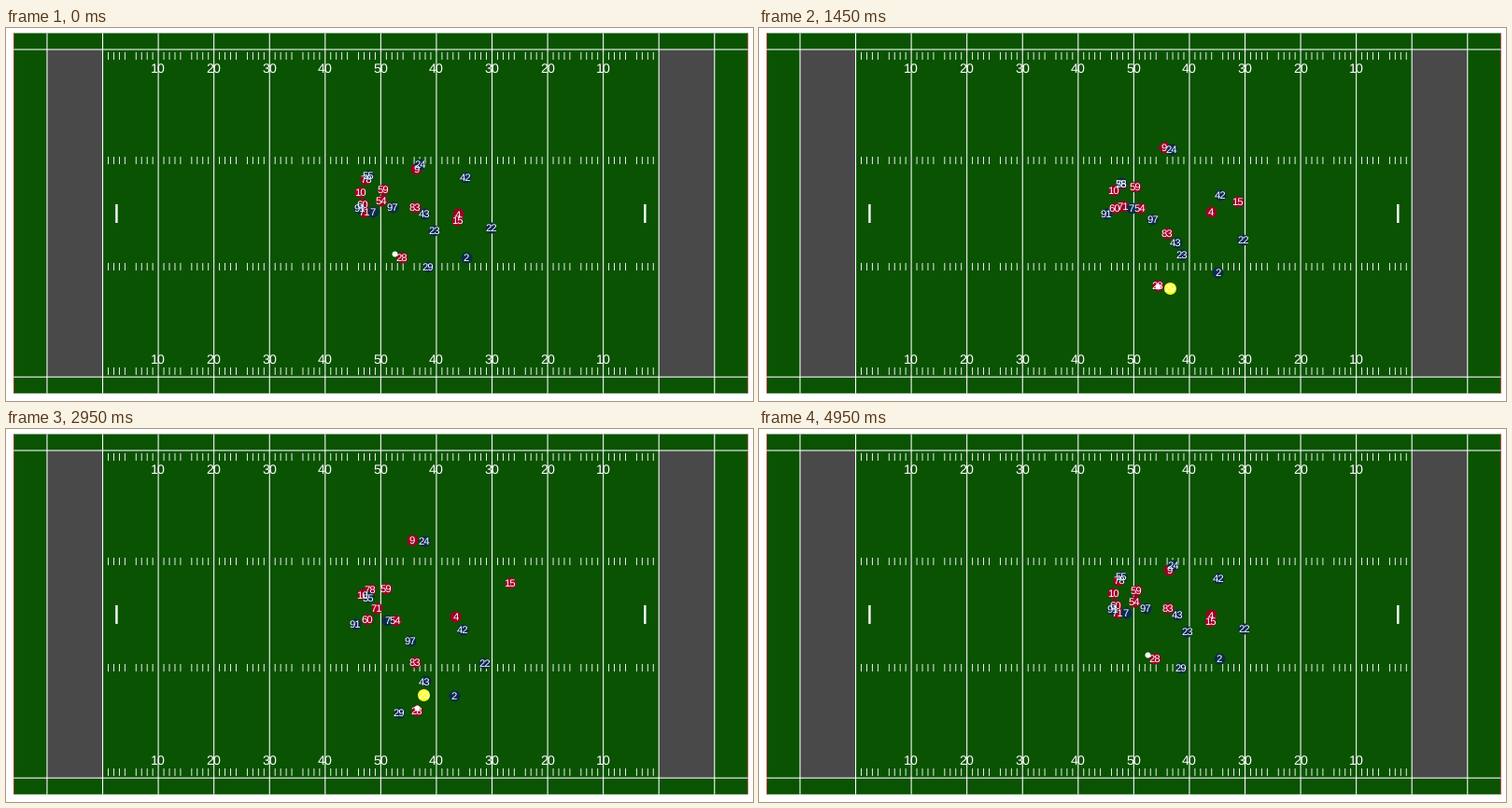
A matplotlib script for the animation above (5 s loop, 800 by 400 pixels).

```python
import numpy as np
import matplotlib.pyplot as plt
from matplotlib.animation import FuncAnimation
from matplotlib.patches import Rectangle

W, H, DPI = 800, 400, 100
FRAMES, STEP_MS = 100, 50
PT = 72 / DPI  # points per pixel
plt.rcParams["text.hinting"] = "none"

GREEN, GRAY = "#0a5302", "#494949"
RED, NAVY, YELLOW = "#9b0026", "#0a2c4c", "#ffff1e"

# The panel spans 132 by 58.67 yards, with 16 and 2.67 yards of margin.
LEFT, RIGHT, TOP, BOTTOM = 8.22, 794.52, 5.48, 391.78
YARD = (RIGHT - LEFT) / 132
GOAL = LEFT + 16 * YARD
MARGIN = (BOTTOM - TOP) / 22
SIDE_TOP, SIDE_BOTTOM = TOP + MARGIN, BOTTOM - MARGIN
REACH = 3.1 * YARD  # a defender this close to the ball is marked
LINE, TEXT_PX = 1.07, 11.4

# Each run is a polynomial through a few points evenly spaced in time.
OFFENSE = {
    28: [(424, 246), (432, 289), (459, 320)],
    9: [(439.5, 151), (433.5, 122), (441, 124.5)],
    78: [(385.5, 162), (392, 176.5)],
    10: [(379, 176), (380.5, 175), (385, 185)],
    59: [(404, 173), (404.5, 170), (414, 174)],
    54: [(401.5, 185), (412, 198), (428, 220)],
    60: [(382, 189), (383, 197), (399.5, 221)],
    71: [(384, 197), (393, 190.5), (404.5, 198)],
    83: [(438, 192), (437, 234), (442, 278)],
    4: [(484, 199.5), (483, 198), (477, 209)],
    15: [(483.5, 206), (526, 176), (561, 144)],
}
DEFENSE = {
    24: [(443.5, 146), (443.5, 124), (460, 118)],
    42: [(492.5, 160), (492.5, 194), (479.5, 264)],
    55: [(388, 158), (388, 172.5), (388.5, 198)],
    97: [(414, 192), (426.5, 214.5), (447.5, 255)],
    43: [(448.5, 199), (447, 248), (454, 316)],
    23: [(458.5, 217), (453, 243), (447.5, 283), (449.5, 322)],
    22: [(519.5, 214), (516, 237), (502.5, 283)],
    2: [(493, 246), (487, 272.5), (461, 316)],
    29: [(452, 256), (440, 279), (421.5, 303.5), (417.5, 310)],
    7: [(393, 197), (403, 196.5), (420.5, 232)],
    91: [(378.5, 193), (371.5, 203.5), (384.5, 222)],
}
BALL = [(416, 242), (427, 277), (439.5, 298.5), (456.5, 319)]


def fit(points):
    n = len(points)
    return np.polyfit(np.linspace(0, 1, n), points, n - 1)


curves = [fit(p) for p in (*OFFENSE.values(), *DEFENSE.values(), BALL)]


def progress(tick):
    """Share of the run at a tick; the data advances on five ticks in six."""
    if tick == FRAMES - 1:  # the last tick is back at the start
        return 0.0
    u = int(0.8375 * tick) / 72
    return u if u < 1 else 1 + 0.7 * (u - 1)


fig = plt.figure(figsize=(W / DPI, H / DPI), dpi=DPI, facecolor="white")
ax = fig.add_axes([0, 0, 1, 1])
ax.set(xlim=(0, W), ylim=(H, 0))
ax.axis("off")


def box(x0, y0, x1, y1, color):
    ax.add_patch(Rectangle((x0, y0), x1 - x0, y1 - y0, fc=color, ec="none",
                           snap=False, zorder=1))


def vlines(x, y0, y1, width=LINE, color="white"):
    ax.vlines(x, y0, y1, colors=color, lw=width * PT, zorder=2).set_snap(False)


def label(x, y, text, px, z):
    return ax.text(x, y + 0.36 * px, str(text), color="white", family="Liberation Sans",
                   size=px * PT, ha="center", va="baseline", zorder=z)


def dots(diameter, color, z):
    return ax.scatter([], [], s=(diameter * PT) ** 2, c=color, linewidths=0, zorder=z)


def yard_x(yard):
    return GOAL + YARD * np.asarray(yard)


def draw_field():
    box(LEFT, TOP, RIGHT, BOTTOM, GREEN)
    for goal in (-10, 100):
        box(yard_x(goal), SIDE_TOP, yard_x(goal + 10), SIDE_BOTTOM, GRAY)
    vlines([LEFT + 0.3, RIGHT - 0.3], TOP, BOTTOM, 0.7, "#c03020")
    vlines(yard_x(range(-10, 111, 10)), TOP, BOTTOM)
    ax.hlines([SIDE_TOP, SIDE_BOTTOM], LEFT, RIGHT, colors="white",
              lw=LINE * PT, zorder=2).set_snap(False)
    hashes = yard_x([y for y in range(100) if y % 5])
    for y in (26, 138, 252, 364):
        vlines(hashes, y, y + 8, 0.9)
    vlines(yard_x([2.5, 97.5]), 189, 209, 2.4)
    for yard in range(10, 100, 10):
        for y in (43, 355):
            label(yard_x(yard), y, min(yard, 100 - yard), 14.2, 3)


draw_field()
offense = dots(12, RED, 4)
defense = dots(12, NAVY, 5)
marked = dots(13, YELLOW, 6)
jerseys = [label(0, 0, n, TEXT_PX, 7) for n in (*OFFENSE, *DEFENSE)]
ball_dot = dots(6, "white", 8)


def draw(tick):
    u = progress(tick)
    spots = np.array([np.polyval(c, u) for c in curves])
    n = len(OFFENSE)
    backs, ball = spots[n:-1], spots[-1]
    offense.set_offsets(spots[:n])
    defense.set_offsets(backs)
    ball_dot.set_offsets([ball])
    gap = np.hypot(*(backs - ball).T)
    near = gap.argmin()
    marked.set_offsets(backs[[near]])
    marked.set_visible(bool(gap[near] < REACH))
    for text, (x, y) in zip(jerseys, spots):
        text.set_position((x, y + 0.36 * TEXT_PX))
    return [offense, defense, marked, ball_dot, *jerseys]


anim = FuncAnimation(fig, draw, frames=FRAMES, interval=STEP_MS,
                     init_func=lambda: draw(0), repeat=True, repeat_delay=0)
plt.show()
```
